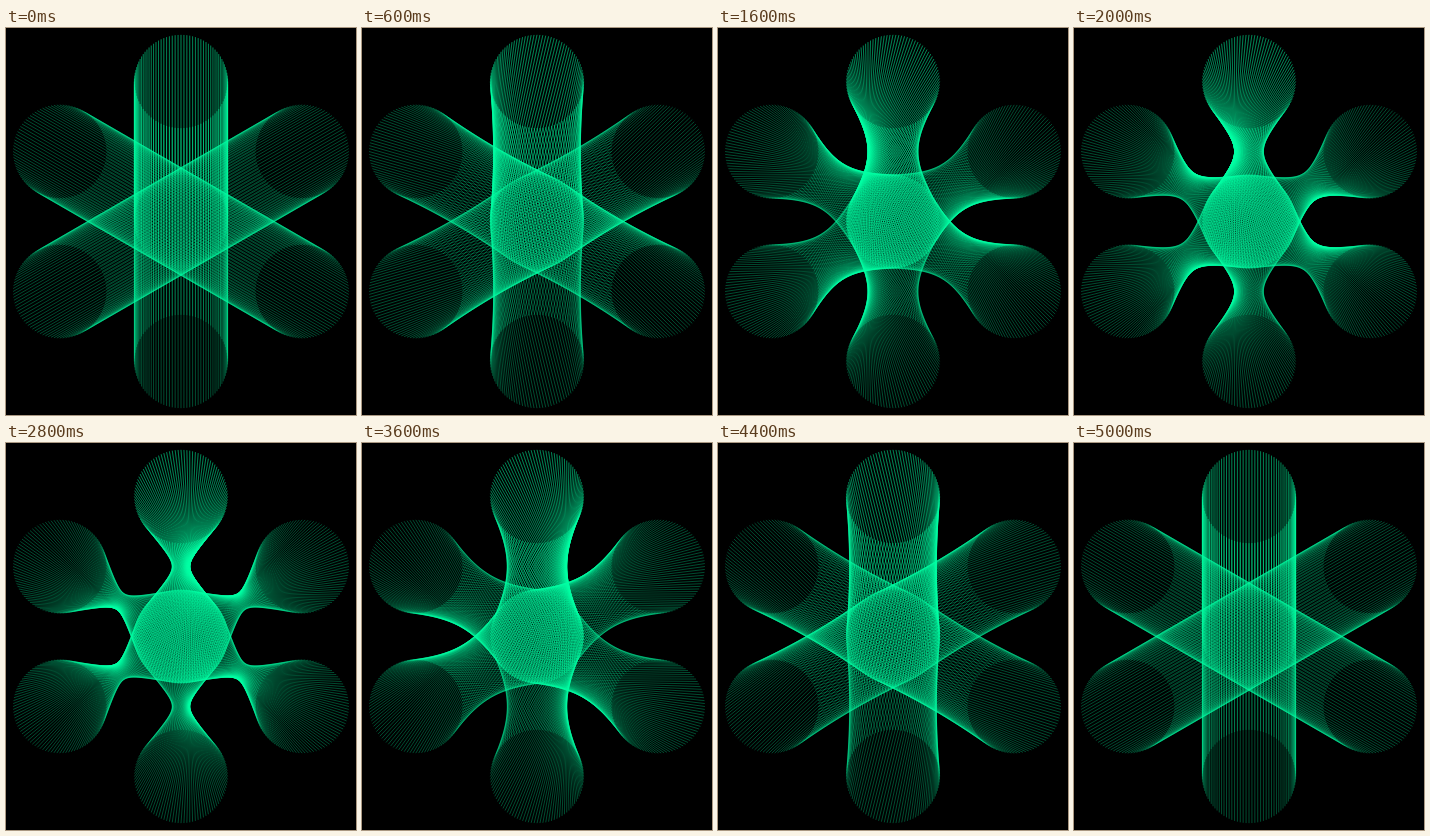
An HTML page with a canvas for the animation above (5.1 s loop, 350 by 387 pixels).

```html
<!DOCTYPE html>
<html lang="en">
<head>
<meta charset="utf-8">
<title>Twisting string figure</title>
<style>
  html, body { margin: 0; width: 100%; height: 100%; overflow: hidden; background: #000; }
  canvas { display: block; }
</style>
</head>
<body>
<canvas id="stage" width="350" height="387"></canvas>
<script>
const ctx = document.getElementById('stage').getContext('2d');
const TAU = Math.PI * 2;
const CX = 175, CY = 193.5;
const DIST = 140, RADIUS = DIST / 3;
const STRINGS = 100;
const STEP_MS = 100, STEPS = 51;

// Strings from one outer ring to the centre ring, turned by `twist`.
function drawArm(angle, twist) {
  const ox = CX + DIST * Math.sin(angle);
  const oy = CY - DIST * Math.cos(angle);
  for (let i = 0; i < STRINGS; i++) {
    const a = TAU * i / STRINGS, b = a + twist;
    ctx.beginPath();
    ctx.moveTo(ox + RADIUS * Math.cos(a), oy + RADIUS * Math.sin(a));
    ctx.lineTo(CX + RADIUS * Math.cos(b), CY + RADIUS * Math.sin(b));
    ctx.stroke();
  }
}

function draw(step) {
  const twist = TAU * step / (STEPS - 1);
  ctx.fillStyle = '#000';
  ctx.fillRect(0, 0, 350, 387);
  ctx.strokeStyle = 'rgba(0, 255, 165, 0.5)';
  ctx.lineWidth = 0.6;
  // Neighbouring arms twist in opposite ways; the top arm is laid down twice.
  for (let k = 0; k <= 6; k++) {
    drawArm(k * TAU / 6, k % 2 ? twist : -twist);
  }
}

const start = performance.now();
let shown = -1;
function tick() {
  const step = Math.floor((performance.now() - start) / STEP_MS) % STEPS;
  if (step !== shown) draw(shown = step);
  requestAnimationFrame(tick);
}
tick();
</script>
</body>
</html>
```
